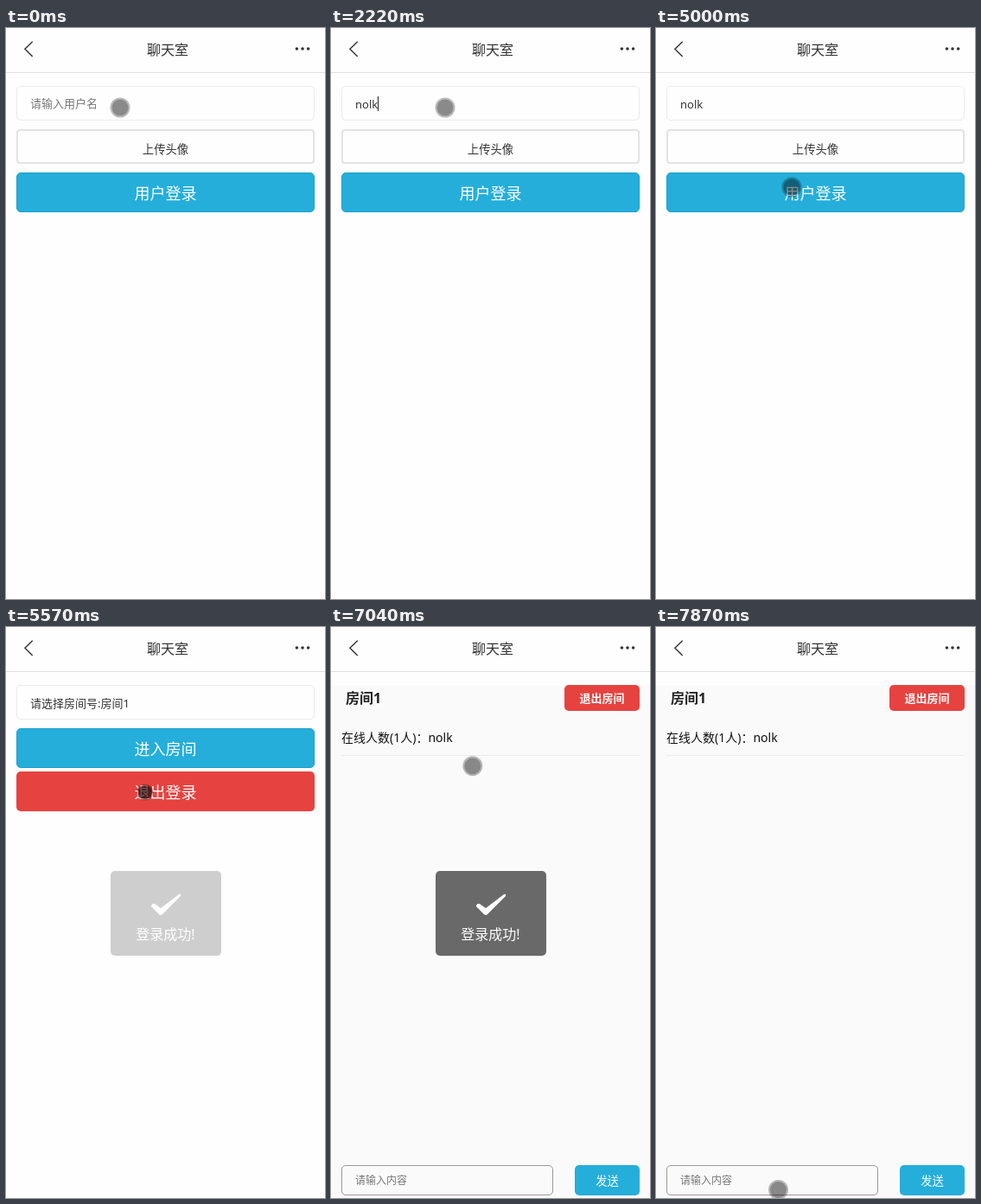
An HTML page with a canvas that plays this animation: 369x660 px, repeating every 8000 ms.

```html
<!DOCTYPE html>
<html lang="zh-CN">
<head>
<meta charset="utf-8">
<title>聊天室</title>
<style>
html, body { margin: 0; width: 100%; height: 100%; overflow: hidden; background: #fefefe; }
canvas { display: block; }
</style>
</head>
<body>
<canvas id="stage" width="369" height="660"></canvas>
<script>
const ctx = document.getElementById('stage').getContext('2d');
const LOOP = 8000;
const FONT = '"Noto Sans", "Noto Sans CJK SC", "Noto Sans CJK", sans-serif';
const BLUE = '#25aeda', BLUE_EDGE = '#1f9fc9', RED = '#e64340', INK = '#333';
const USER = 'nolk';
const TYPING = 1010, KEY_GAP = 147, COMMIT = 1770, BLINK = 530;
const LOBBY = 5400, ROOM = 6750, TOAST_IN = 5485, TOAST_OUT = 7000, FADE = 300;

// The pointer rests between moves
const MOVES = [
  { from: 2230, to: 2380, x: 197, y: 146 },
  { from: 2600, to: 2620, x: 211.5, y: 146.5 },
  { from: 2990, to: 3530, x: 304, y: 146, sag: 8 },
  { from: 3530, to: 4910, x: 242, y: 165 },
  { from: 4910, to: 5000, x: 157, y: 184 },
  { from: 5180, to: 5260, x: 161, y: 191 },
  { from: 5700, to: 5960, x: 165.5, y: 139.5 },
  { from: 7000, to: 7390, x: 149.5, y: 346.5 },
  { from: 7390, to: 7660, x: 111, y: 570 },
  { from: 7660, to: 7870, x: 141.5, y: 650.5 }
];

const within = (t, from, to) => t >= from && t < to;
const progress = (t, from, to) => Math.max(0, Math.min(1, (t - from) / (to - from)));

function text(str, x, midY, size, color = INK, align = 'left', weight = 400) {
  ctx.font = `${weight} ${size}px ${FONT}`;
  ctx.textAlign = align;
  ctx.fillStyle = color;
  ctx.fillText(str, x, Math.round(midY + size * 0.37));
}

function box(x, y, w, h, r, fill, stroke, line = 1) {
  const inset = stroke ? line / 2 : 0;
  ctx.beginPath();
  ctx.roundRect(x + inset, y + inset, w - 2 * inset, h - 2 * inset, r - inset);
  if (fill) { ctx.fillStyle = fill; ctx.fill(); }
  if (stroke) { ctx.strokeStyle = stroke; ctx.lineWidth = line; ctx.stroke(); }
}

function disc(x, y, r, fill) {
  ctx.beginPath();
  ctx.arc(x, y, r, 0, 2 * Math.PI);
  ctx.fillStyle = fill;
  ctx.fill();
}

function bigButton(label, y, fill, edge, active) {
  box(12, y, 345, 46, 5, fill, edge);
  text(label, 184.5, y + 24, 18, active ? 'rgba(255,255,255,.6)' : '#fff', 'center');
}

function header() {
  ctx.strokeStyle = INK;
  ctx.lineWidth = 1.4;
  ctx.stroke(new Path2D('M30.7 15.7L21.9 24.3L30.7 32.9'));
  text('聊天室', 187, 25.5, 16, INK, 'center');
  for (let i = -1; i <= 1; i++) disc(343 + 6.6 * i, 24, 1.8, INK);
  ctx.fillStyle = '#e0e0e0';
  ctx.fillRect(0, 51, 369, 1);
}

function login(t) {
  const typed = USER.slice(0, Math.max(0, Math.floor((t - TYPING) / KEY_GAP) + 1));
  box(12, 67, 345, 40, 5, null, '#ebebeb');
  if (typed) text(typed, 28, 88.2, 13);
  else text('请输入用户名', 28, 87.5, 13, '#777');
  if (within(t, 330, 330 + BLINK) || within(t, TYPING, COMMIT + BLINK)) {
    ctx.font = `13px ${FONT}`;
    ctx.fillStyle = '#222';
    ctx.fillRect(28 + Math.floor(ctx.measureText(typed).width), 79, 1, 17);
  }
  box(12, 117, 345, 40, 4, null, '#e3e3e3', 2);
  text('上传头像', 184.5, 140.5, 13.33, within(t, 2620, 2680) ? '#888' : INK, 'center');
  bigButton('用户登录', 167, BLUE, BLUE_EDGE, within(t, 5350, LOBBY));
}

function lobby(t) {
  box(12, 67, 345, 40, 5, null, '#ebebeb');
  text('请选择房间号:房间1', 28, 87.8, 13);
  bigButton('进入房间', 117, BLUE, BLUE_EDGE, t >= 6720);
  bigButton('退出登录', 167, RED);
}

function room() {
  ctx.fillStyle = '#fafafa';
  ctx.fillRect(0, 67, 369, 593);
  text('房间1', 17, 82.5, 16, '#222', 'left', 700);
  box(270, 67, 87, 30, 5, RED);
  text('退出房间', 313.5, 82.3, 13, '#fff', 'center', 700);
  text(`在线人数(1人)：${USER}`, 12, 128, 14, '#111');
  ctx.fillStyle = '#ebebeb';
  ctx.fillRect(12, 148, 345, 1);
  box(12, 622, 245, 35, 5, null, '#999');
  text('请输入内容', 28, 640, 12, '#777');
  box(282, 622, 75, 35, 5, BLUE);
  text('发送', 319.5, 640, 13.33, '#fff', 'center');
}

function toast(t) {
  const shown = progress(t, TOAST_IN, TOAST_IN + FADE) - progress(t, TOAST_OUT, TOAST_OUT + FADE);
  if (shown <= 0) return;
  box(121, 282, 128, 98, 5, `rgba(0,0,0,${0.665 * shown})`);
  ctx.fillStyle = '#fff';
  ctx.fill(new Path2D('M168 322q1-3 4-2l7 5L200 309q3-1 2 2L181 332q-2 2-4 0L168 323z'));
  text('登录成功!', 184.5, 355.5, 16, '#fff', 'center', 500);
}

function pointerAt(t) {
  let x = 132, y = 92;
  for (const move of MOVES) {
    const k = progress(t, move.from, move.to);
    x += (move.x - x) * k;
    y += (move.y - y) * k + (move.sag || 0) * Math.sin(Math.PI * k);
  }
  return [x, y];
}

function pointer(t) {
  if (within(t, 3530, 4910)) return;
  const [x, y] = pointerAt(t);
  const pressed = within(t, 2620, 2830) || within(t, 5350, 5680);
  disc(x, y, pressed ? 9.5 : 11.5, 'rgba(0,0,0,.27)');
  disc(x, y, pressed ? 8 : 9.5, `rgba(0,0,0,${pressed ? 0.48 : 0.25})`);
}

function draw(t) {
  ctx.fillStyle = '#fefefe';
  ctx.fillRect(0, 0, 369, 660);
  header();
  if (t < LOBBY) login(t);
  else if (t < ROOM) lobby(t);
  else room();
  toast(t);
  pointer(t);
}

let start;
function tick(now) {
  start ??= now;
  draw((now - start) % LOOP);
  requestAnimationFrame(tick);
}
requestAnimationFrame(tick);
</script>
</body>
</html>
```
